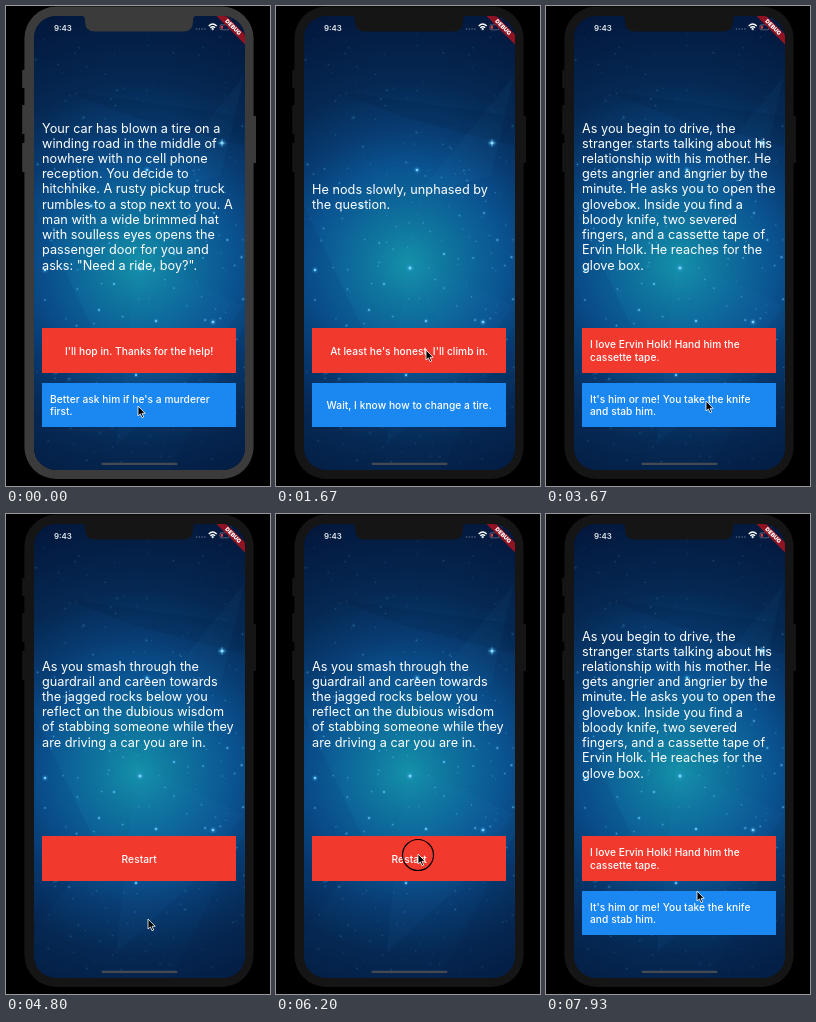
Write an HTML page with a canvas that moves like this. It is 264 px wide and 480 px high and loops after 8 s.

```html
<!DOCTYPE html>
<html lang="en">
<head>
<meta charset="utf-8">
<title>Story game</title>
<style>
html, body { margin: 0; width: 100%; height: 100%; overflow: hidden; background: #000; }
#stage { position: relative; width: 264px; height: 480px; overflow: hidden; color: #fff; font-family: Inter, "Liberation Sans", sans-serif; }
#stage > *, .page > * { position: absolute; }
svg, canvas { left: 0; top: 0; }

.body { animation: focus 8s step-end infinite; }
@keyframes focus { 0% { fill: #3b3b3b; } 1% { fill: #151515; } }

.time { left: 48px; top: 16.5px; font: 600 7.9px/11px Inter, sans-serif; color: #e4e8ee; }
.clip { left: 28px; top: 10px; width: 211px; height: 454px; border-radius: 22px; overflow: hidden; }
.debug {
  position: absolute; left: 168.6px; top: 8.4px; width: 60px; height: 6.8px; transform: rotate(45deg);
  background: rgba(160, 18, 32, .9); text-align: center; font: 900 5.7px/6.8px Inter, sans-serif;
}

.page { inset: 0; visibility: hidden; animation: 8s step-end infinite; }
.story { left: 36px; top: 190.6px; transform: translateY(-50%); white-space: pre; font-size: 12.7px; line-height: 15.22px; letter-spacing: .02px; }
.btn {
  left: 36px; width: 194.4px; height: 44.5px; box-sizing: border-box; padding: 0 8px;
  display: flex; align-items: center; justify-content: center;
  white-space: pre; font-size: 10.2px; font-weight: 500; line-height: 12.1px; letter-spacing: .05px;
}
.btn.two { justify-content: flex-start; }
.red { top: 322.3px; background: #f1392e; }
.blue { top: 376.6px; background: #1b87f0; }

#tire { animation-name: tire; }
#nod { animation-name: nod; }
#drive { animation-name: drive; }
#crash { animation-name: crash; }
@keyframes tire { 0%, 78.375% { visibility: visible; } 15.875%, 89.125% { visibility: hidden; } }
@keyframes nod { 15.875% { visibility: visible; } 26.625% { visibility: hidden; } }
@keyframes drive { 26.625%, 89.125% { visibility: visible; } 55%, 0% { visibility: hidden; } 100% { visibility: visible; } }
@keyframes crash { 55% { visibility: visible; } 78.375% { visibility: hidden; } }

.mouse { animation: move 8s ease-in-out infinite; }
@keyframes move {
  0%, 16.5% { transform: translate(132px, 400px); }
  20.5%, 33.4% { transform: translate(150px, 344px); }
  43%, 47% { transform: translate(160px, 395px); }
  51%, 55.5% { transform: translate(160px, 400px); }
  59.6%, 61.5% { transform: translate(142px, 405px); }
  69.5%, 79% { transform: translate(142px, 340px); }
  85.5%, 94.5% { transform: translate(151px, 346px); }
  99%, 100% { transform: translate(151px, 377px); }
}
.ring { animation: press 8s step-end infinite; }
@keyframes press {
  0%, 3.375%, 15.875%, 26.625%, 55%, 78.375%, 89.125% { opacity: 0; }
  1%, 13.375%, 24.125%, 52.5%, 75.875%, 86.6% { opacity: 1; }
}
</style>
</head>
<body>
<div id="stage">
  <svg width="264" height="480">
    <g class="body">
      <rect x="18.4" y=".6" width="229.2" height="472.4" rx="32"/>
      <path d="M16.2 64h3v18h-3zM16.2 99h3v29h-3zM16.2 137h3v29h-3zM247 110h3v47h-3z"/>
    </g>
  </svg>
  <canvas id="sky" width="264" height="480"></canvas>
  <svg width="264" height="480">
    <path class="body" d="M75 9.5q4 0 4 5v1q0 10 10 10h88q10 0 10-10v-1q0-5 4-5z"/>
    <g fill="#fff" fill-opacity=".35">
      <circle cx="190.5" cy="23" r=".8"/><circle cx="193.3" cy="23" r=".8"/>
      <circle cx="196.1" cy="23" r=".8"/><circle cx="198.9" cy="23" r=".8"/>
    </g>
    <g fill="none" stroke="#fff" stroke-width="1.4">
      <path d="M202.7 19.9q4-3.6 8 0M204.3 21.8q2.4-2.1 4.8 0"/>
      <circle cx="206.7" cy="23.2" r=".4"/>
      <rect x="214" y="18.8" width="9" height="5" rx="1.2" stroke-width=".7" stroke-opacity=".4"/>
    </g>
    <path d="M215 19.8h2v3H215z" fill="#e8343a"/>
    <rect x="95.5" y="456.8" width="76" height="2.2" rx="1.1" fill="#454a52"/>
  </svg>
  <div class="time">9:43</div>
  <div class="clip"><div class="debug">DEBUG</div></div>
  <div id="pages"></div>
  <svg width="264" height="480">
    <g class="mouse">
      <circle class="ring" cy="1" r="15.5" fill="none" stroke="#000" stroke-width="1.2"/>
      <path d="M0 0V10L2.4 7.9 4 11.7 5.7 11 4.1 7.3H7.2Z" stroke="#fff" stroke-width=".8"/>
    </g>
  </svg>
</div>
<script>
const pages = {
  tire: [`Your car has blown a tire on a
winding road in the middle of
nowhere with no cell phone
reception. You decide to
hitchhike. A rusty pickup truck
rumbles to a stop next to you. A
man with a wide brimmed hat
with soulless eyes opens the
passenger door for you and
asks: "Need a ride, boy?".`,
    "I'll hop in. Thanks for the help!", "Better ask him if he's a murderer\nfirst."],
  nod: ["He nods slowly, unphased by\nthe question.",
    "At least he's honest, I'll climb in.", "Wait, I know how to change a tire."],
  drive: [`As you begin to drive, the
stranger starts talking about his
relationship with his mother. He
gets angrier and angrier by the
minute. He asks you to open the
glovebox. Inside you find a
bloody knife, two severed
fingers, and a cassette tape of
Ervin Holk. He reaches for the
glove box.`,
    "I love Ervin Holk! Hand him the\ncassette tape.", "It's him or me! You take the knife\nand stab him."],
  crash: [`As you smash through the
guardrail and careen towards
the jagged rocks below you
reflect on the dubious wisdom
of stabbing someone while they
are driving a car you are in.`, "Restart"]
};

function add(parent, cls, text = "") {
  const el = document.createElement("div");
  el.className = cls;
  el.textContent = text;
  return parent.appendChild(el);
}

const holder = document.getElementById("pages");
for (const [id, [story, ...choices]] of Object.entries(pages)) {
  const page = add(holder, "page");
  page.id = id;
  add(page, "story", story);
  choices.forEach((text, i) =>
    add(page, `btn ${i ? "blue" : "red"}${text.includes("\n") ? " two" : ""}`, text));
}

// Night sky: glow, facets and seeded stars
const ctx = document.getElementById("sky").getContext("2d");
let seed = 11;
const rnd = () => (seed = seed * 16807 % 2147483647) / 2147483647;

function glow(x, y, r, stops) {
  const g = ctx.createRadialGradient(x, y, 0, x, y, r);
  stops.forEach(([at, color]) => g.addColorStop(at, color));
  ctx.fillStyle = g;
  ctx.fillRect(x - r, y - r, 2 * r, 2 * r);
}

function facet(color, ...pts) {
  ctx.fillStyle = color;
  ctx.beginPath();
  for (let i = 0; i < pts.length; i += 2) ctx.lineTo(pts[i], pts[i + 1]);
  ctx.fill();
}

function star(x, y, r, a) {
  glow(x, y, r * 3, [[0, `rgba(70,190,250,${a * .7})`], [1, "rgba(50,160,235,0)"]]);
  ctx.fillStyle = `rgba(140,220,255,${a})`;
  ctx.beginPath();
  ctx.arc(x, y, r, 0, 7);
  ctx.fill();
}

ctx.beginPath();
ctx.roundRect(28, 10, 211, 454, 22);
ctx.clip();
ctx.fillStyle = "#03163a";
ctx.fillRect(0, 0, 264, 480);
glow(132, 258, 270, [[0, "#1490a8"], [.15, "#0f749e"], [.36, "#0a5391"], [.5, "#083c72"], [.68, "#052852"], [1, "#03163a"]]);

facet("rgba(0,10,45,.1)", 60, 85, 238, 110, 238, 140, 130, 112);
facet("rgba(60,170,220,.04)", 238, 70, 140, 190, 215, 170);
facet("rgba(0,20,70,.08)", 28, 200, 90, 330, 28, 420);
facet("rgba(50,160,220,.04)", 130, 250, 238, 300, 190, 365, 110, 440);
facet("rgba(0,15,60,.08)", 238, 320, 238, 464, 165, 464);

// Stars fade with distance from the glow
for (let i = 0; i < 240; i++) {
  const x = 28 + rnd() * 211, y = 10 + rnd() * 454;
  const near = Math.max(.25, 1 - Math.abs(y - 265) / 230);
  star(x, y, .35 + rnd() * .55, near * (.12 + rnd() * .45));
}
const bright = [[216, 137, 1.6], [141, 164, 1.3], [85, 200, 1.3], [134, 262, 1.5], [39, 264, 1.2],
  [207, 316, 1.3], [150, 315, 1], [108, 278, .8], [93, 304, .8], [168, 248, .8], [50, 366, 1], [130, 369, 1]];
bright.forEach(([x, y, r]) => star(x, y, r, .85));
facet("rgba(150,225,255,.6)", 216, 132, 216.6, 136.4, 221, 137, 216.6, 137.6, 216, 142, 215.4, 137.6, 211, 137, 215.4, 136.4);
</script>
</body>
</html>
```
